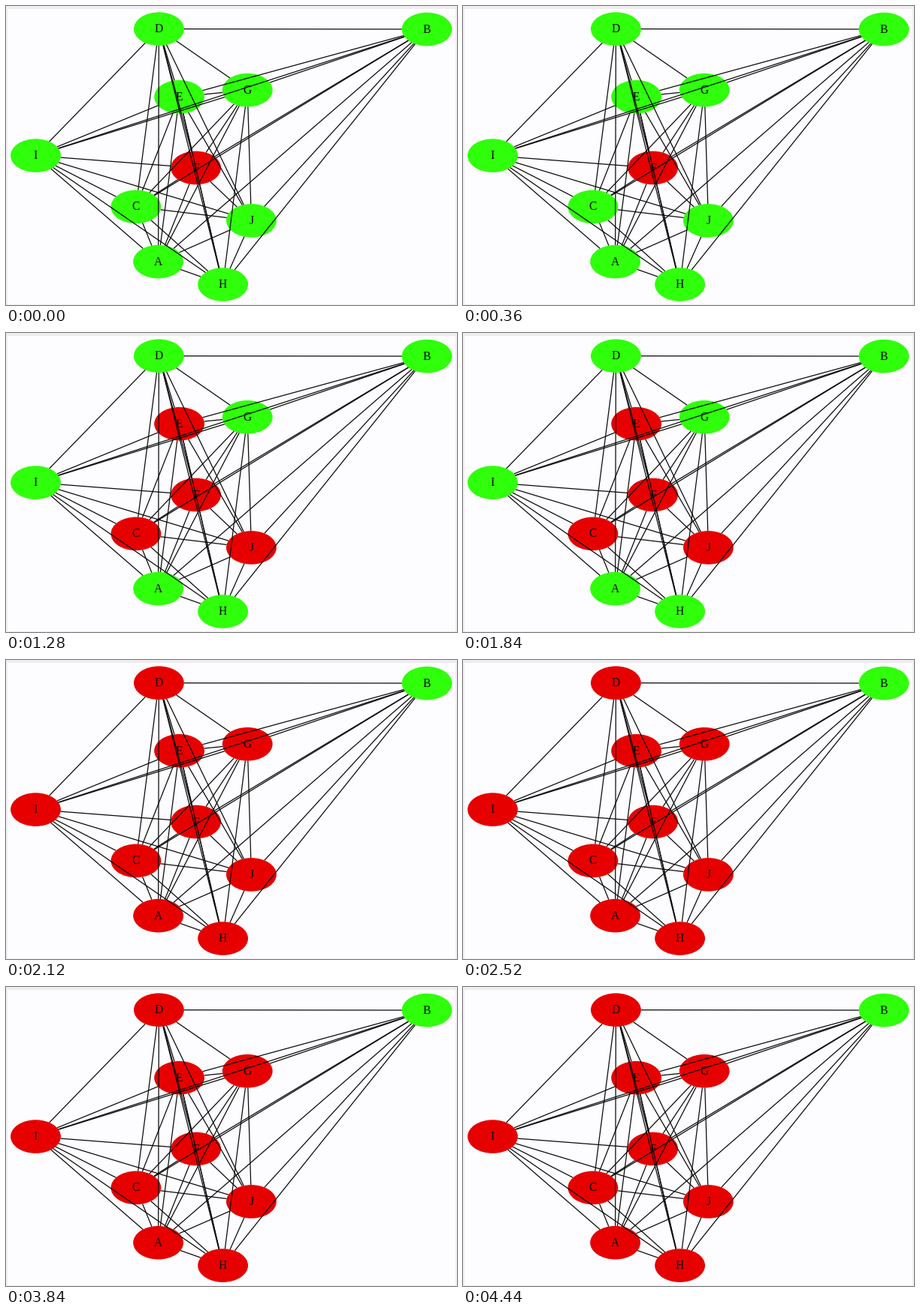
Animation of 600 by 399 pixels, one loop 4720 ms. Source, as a matplotlib script:

```python
from itertools import combinations
from math import hypot

import matplotlib.pyplot as plt
from matplotlib.animation import FuncAnimation
from matplotlib.patches import Ellipse, Rectangle

W, H, DPI = 600, 399, 100
STEP, LOOP = 40, 4720
PX = 72 / DPI
RX, RY = 33.4, 22.3
GREEN, RED, INK = "#2fff0a", "#e60000", "#0a0a0a"

NODES = {
    "A": (202.6, 341.2), "B": (560.0, 31.0), "C": (172.9, 267.9),
    "D": (203.4, 30.6), "E": (230.6, 121.2), "F": (252.6, 216.0),
    "G": (321.2, 112.2), "H": (288.6, 371.6), "I": (39.5, 199.6),
    "J": (326.4, 286.4),
}

# time in ms from which each set of nodes is red
STAGES = [(0, "F"), (800, "FCEJ"), (2120, "ACDEFGHIJ")]


def rim(a, b):
    """Point where the line from a to b leaves the ellipse around a."""
    dx, dy = b[0] - a[0], b[1] - a[1]
    k = 1 / hypot(dx / RX, dy / RY)
    return a[0] + dx * k, a[1] + dy * k


fig = plt.figure(figsize=(W / DPI, H / DPI), dpi=DPI, facecolor="#efedf0")
ax = fig.add_axes([0, 0, 1, 1])
ax.set_xlim(0, W)
ax.set_ylim(H, 0)
ax.axis("off")
ax.add_patch(Rectangle((2, 4), 596, 394, fc="#fdfcfe", lw=0))

discs = {}
for name, (x, y) in NODES.items():
    discs[name] = ax.add_patch(
        Ellipse((x, y), 2 * RX, 2 * RY, fc=GREEN, lw=0, zorder=2))
    ax.text(x, y + 4.6, name, ha="center", va="baseline", color=INK,
            family="Liberation Serif", size=15.5 * PX, zorder=3)

for a, b in combinations(NODES.values(), 2):
    p, q = rim(a, b), rim(b, a)
    ax.plot([p[0], q[0]], [p[1], q[1]], color=INK, lw=1.25 * PX,
            solid_capstyle="butt", zorder=4)


def update(i):
    red = [names for start, names in STAGES if start <= i * STEP][-1]
    for name, disc in discs.items():
        disc.set_facecolor(RED if name in red else GREEN)
    return list(discs.values())


anim = FuncAnimation(fig, update, frames=LOOP // STEP, interval=STEP,
                     repeat=True, repeat_delay=0, blit=False)
plt.show()
```
